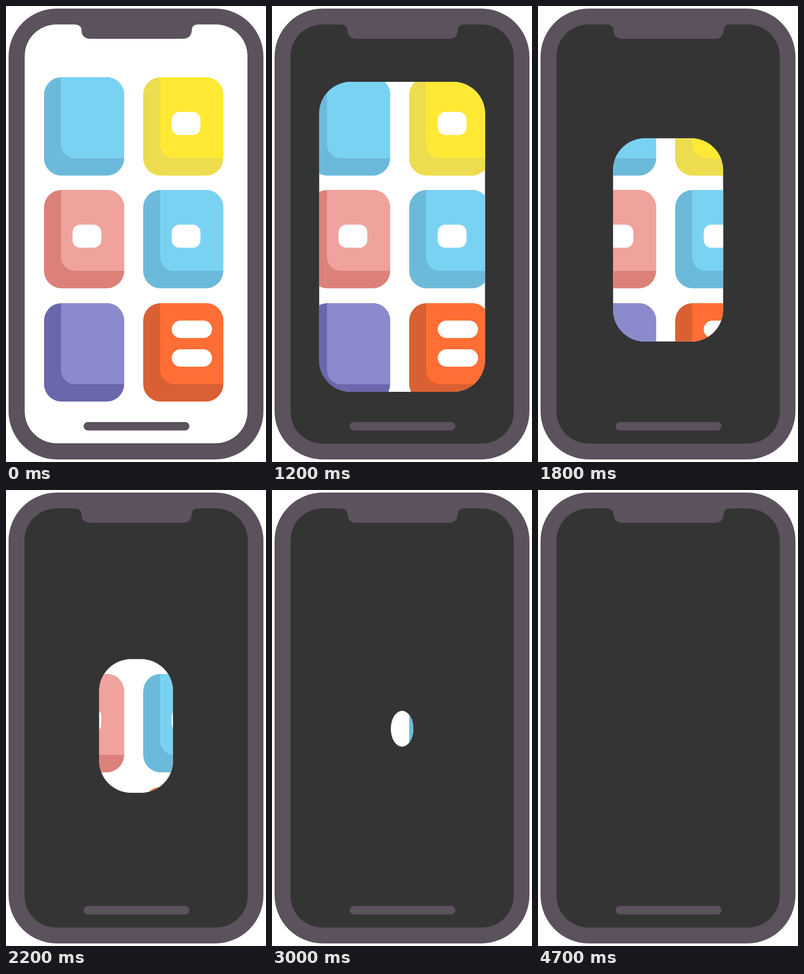
Write an HTML page that moves like this. It is 506 by 890 pixels and loops after 4.8 s.

```html
<!DOCTYPE html>
<html lang="en">
<head>
<meta charset="utf-8">
<title>Phone screen closing</title>
<style>
  html, body { margin: 0; width: 100%; height: 100%; overflow: hidden; background: #fff; }
  svg { display: block; width: 100vw; height: 100vh; }
</style>
</head>
<body>
<svg viewBox="0 0 506 890">
  <defs>
    <clipPath id="screenClip"><use href="#screen"/></clipPath>
    <clipPath id="windowClip"><rect id="window" rx="62"/></clipPath>
    <clipPath id="tileClip"><rect width="156" height="192" rx="34"/></clipPath>
  </defs>
  <rect x="5" y="5" width="496" height="880" rx="94" fill="#5b525d"/>
  <path id="screen" fill="#343434" d="M98 36H132Q147 36 147 48Q148 64 165 64H343Q361 64 361.500 47Q362 36 374 36H408.500A62 62 0 0 1 470.500 98V792A62 62 0 0 1 408.500 854H98A62 62 0 0 1 36 792V98A62 62 0 0 1 98 36Z"/>
  <g clip-path="url(#screenClip)">
    <g id="content" clip-path="url(#windowClip)">
      <rect width="506" height="890" fill="#fff"/>
    </g>
  </g>
  <rect x="151" y="812" width="206" height="16.500" rx="8.250" fill="#5b525d"/>
</svg>
<script>
  const LOOP = 4800, STEP = 100;
  const content = document.getElementById('content');
  const hole = document.getElementById('window');

  const square = '<rect x="55.5" y="67.800" width="56" height="45" rx="15" fill="#fff"/>';
  const pill = y => `<rect x="55.5" y="${y}" width="78.500" height="34" rx="17" fill="#fff"/>`;

  // x, y, face, shade, marks
  const tiles = [
    [74, 139, '#7ad2f3', '#6cbada', ''],
    [267, 139, '#ffe934', '#ecdc4e', square],
    [74, 359, '#f0a29d', '#dc8179', square],
    [267, 359, '#7ad2f3', '#6cbada', square],
    [74, 580, '#8b8acd', '#6b67ae', ''],
    [267, 580, '#ff6e35', '#d96032', pill(34) + pill(90)]
  ];
  content.innerHTML += tiles.map(([x, y, face, shade, marks]) =>
    `<g transform="translate(${x} ${y})"><g clip-path="url(#tileClip)">
      <rect width="156" height="192" fill="${shade}"/>
      <path d="M33 0H156V158H60A27 27 0 0 1 33 131Z" fill="${face}"/>
      ${marks}</g></g>`).join('');

  // Window height over time, joined by a smooth Hermite curve
  const keys = [[600, 818], [900, 741], [1200, 605], [1500, 505], [2200, 261], [3000, 70], [3700, 0]];
  const slope = i => {
    const a = keys[i - 1], b = keys[i + 1];
    return a && b ? (b[1] - a[1]) / (b[0] - a[0]) : 0;
  };

  function heightAt(t) {
    if (t <= keys[0][0]) return keys[0][1];
    const i = keys.findIndex(k => k[0] > t);
    if (i < 0) return 0;
    const [t0, h0] = keys[i - 1], [t1, h1] = keys[i];
    const d = t1 - t0, u = (t - t0) / d, v = 1 - u;
    return h0 * v * v * (1 + 2 * u) + h1 * u * u * (3 - 2 * u)
      + d * u * v * (slope(i - 1) * v - slope(i) * u);
  }

  function draw(now) {
    const t = Math.floor((now % LOOP) / STEP) * STEP;
    const h = heightAt(t);
    const w = Math.min(h, 7.5 + 0.521 * h);
    const box = { x: 253.2 - w / 2, y: 468 - 0.0288 * h - h / 2, width: w, height: h };
    for (const name in box) hole.setAttribute(name, box[name]);
    content.style.display = h > 0 ? '' : 'none';
  }

  let start;
  function tick(now) {
    start ??= now;
    draw(now - start);
    requestAnimationFrame(tick);
  }
  draw(0);
  requestAnimationFrame(tick);
</script>
</body>
</html>
```
